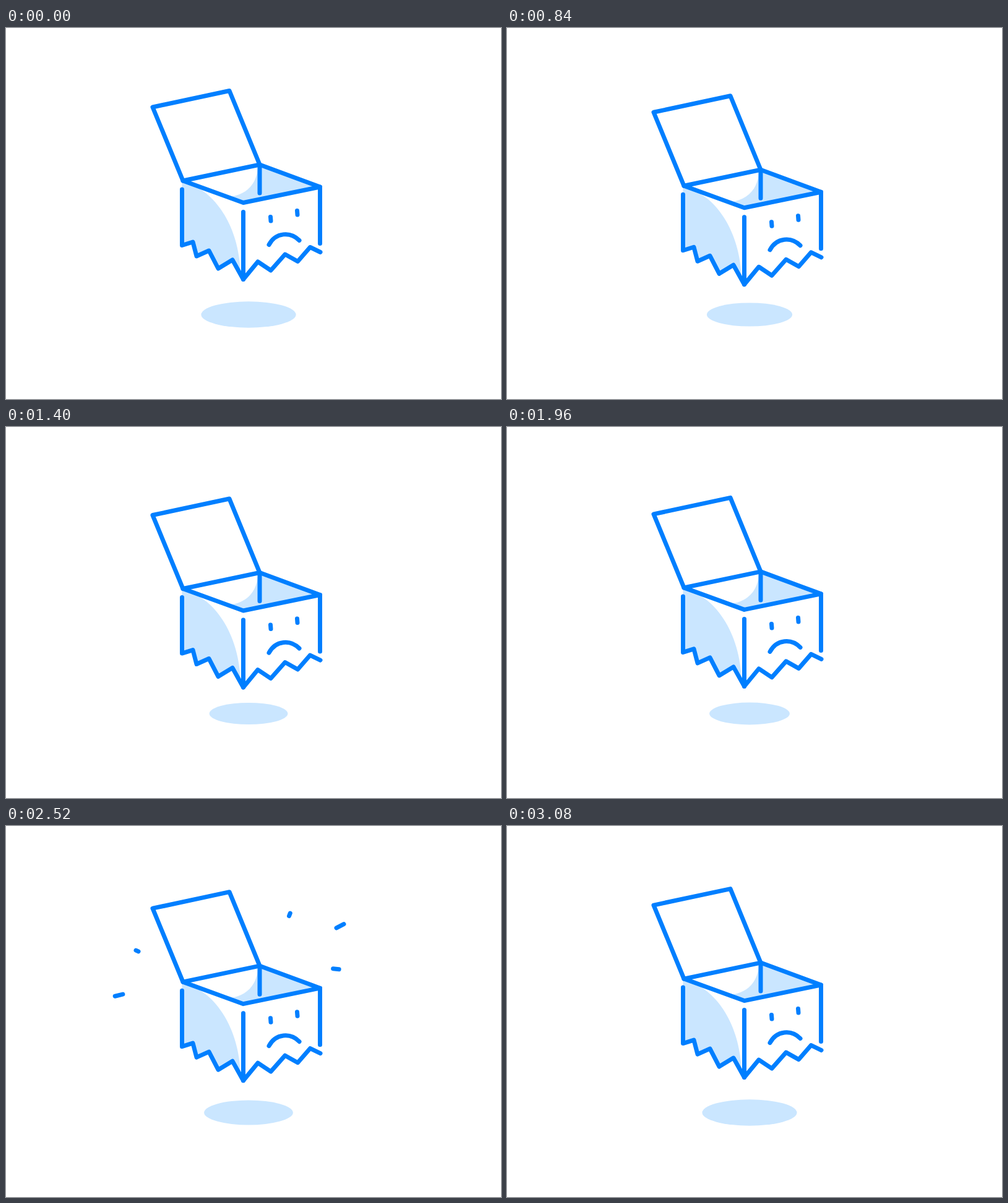
Animation of 800x600 px, one loop 3.15 s. Source, as an HTML page:

```html
<!DOCTYPE html>
<html lang="en">
<head>
<meta charset="utf-8">
<title>Empty box</title>
<style>
  html, body { margin: 0; width: 100%; height: 100%; overflow: hidden; background: #fff; }
  svg { display: block; width: 100vw; height: 100vh; }
  .line { fill: none; stroke: #007fff; stroke-width: 7; stroke-linecap: round; stroke-linejoin: round; }
  .shade { fill: #cae6ff; }
</style>
</head>
<body>
<svg viewBox="0 0 800 600">
  <ellipse id="shadow" class="shade" cx="392" cy="463.5" rx="76.6" ry="21.2"/>
  <g id="box">
    <g class="shade">
      <path d="M284.5 249C335 258 378 320 379 399L366 375 343 389 328 360 308 369 302 346 284.5 351.5Z"/>
      <path d="M407 222C407 250 390 270 361 273L383.5 282.5 507.5 257 410 221Z"/>
    </g>
    <g class="line">
      <path d="M286 247L237 128 361 101.5 410 221"/>
      <path d="M286 247L410 221 507.5 257 383.5 282.5Z"/>
      <path d="M410 221V267M383.5 297.5V406.5M507.5 257V348.5"/>
      <path d="M284.5 261V351.5L302 346 308 369 328 360 343 389 366 375 383.5 406.5 407 378 428 392 451 366 471.5 377.5 491.5 354.5 508 362.5"/>
      <path d="M427.5 305.5L428 312M470.5 295.5L471 302"/>
      <path d="M425 350.5C436 330 460 329 474 343.5"/>
    </g>
  </g>
  <path id="sparks" class="line"/>
</svg>
<script>
  const LOOP = 3150, STEP = 70;
  const SPARK_START = 2240, SPARK_LIFE = 560;
  const [box, shadow, sparks] = ['box', 'shadow', 'sparks'].map(id => document.getElementById(id));

  // Centre of each spark's track, then half of its outward extent
  const tracks = [
    [182.5, 273.7, -23.5, 5.8],
    [212, 202, -7.3, -3.6],
    [458.4, 143.3, 3.2, -8.2],
    [540, 161.7, 22, -11.5],
    [533.4, 231.2, 17.5, 2]
  ];

  function sparkPath(p) {
    if (p <= 0 || p >= 1) return '';
    const tail = Math.max(0, (p - 0.213) / 0.787) * 2 - 1;
    const head = Math.min(1, p / 0.787) * 2 - 1;
    return tracks.map(([x, y, dx, dy]) =>
      `M${x + dx * tail} ${y + dy * tail}L${x + dx * head} ${y + dy * head}`).join('');
  }

  function draw(now) {
    const t = Math.floor(now % LOOP / STEP) * STEP;
    const sink = (1 - Math.cos(2 * Math.PI * t / LOOP)) / 2;
    const size = 1 - 0.178 * sink;
    box.setAttribute('transform', `translate(0 ${15 * sink})`);
    shadow.setAttribute('rx', 76.6 * size);
    shadow.setAttribute('ry', 21.2 * size);
    sparks.setAttribute('d', sparkPath((t - SPARK_START) / SPARK_LIFE));
  }

  function tick() {
    draw(performance.now());
    requestAnimationFrame(tick);
  }
  tick();
</script>
</body>
</html>
```
